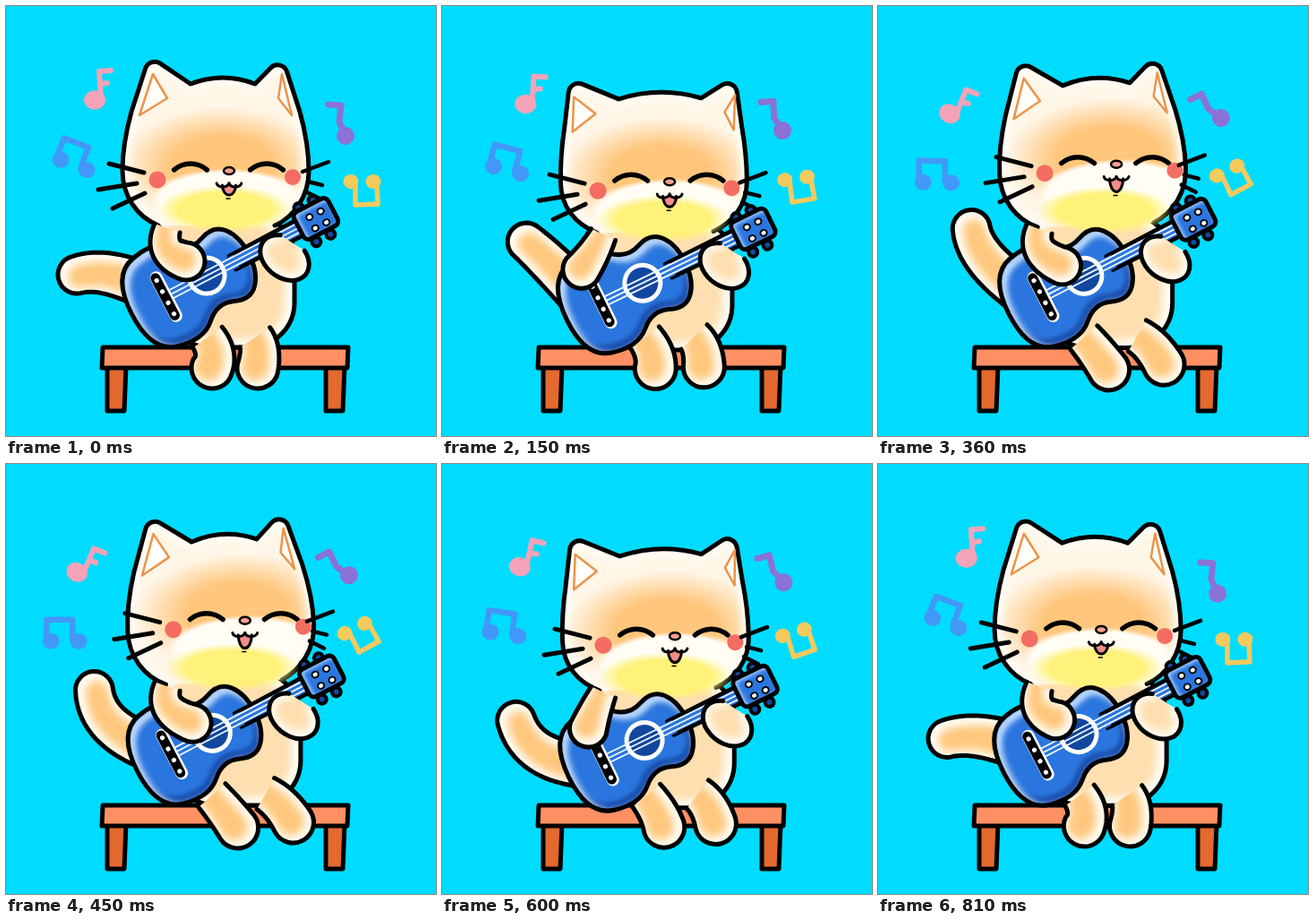
Animation of 480x480 px, one loop 840 ms. Source, as an HTML page with a canvas:

```html
<!DOCTYPE html>
<html lang="en">
<head>
<meta charset="utf-8">
<title>Guitar cat</title>
<style>
  html, body { margin: 0; width: 100%; height: 100%; overflow: hidden; background: #00dcff; }
  canvas { display: block; width: 480px; height: 480px; }
</style>
</head>
<body>
<canvas id="stage" width="480" height="480"></canvas>
<script>
const c = document.getElementById('stage').getContext('2d');
const LOOP = 840, STEP = 30, PI = Math.PI, RAD = PI / 180;
const INK = '#000', FUR = '#ffc87e', PALE = '#ffdfb0', RIM = '#fffdf6', BLUE = '#2a76de';

// ---- paths

function poly(...p) {
  const path = new Path2D();
  for (let i = 0; i < p.length; i += 2) path.lineTo(p[i], p[i + 1]);
  return path;
}

function closed(...p) {
  const path = poly(...p);
  path.closePath();
  return path;
}

function arc(x, y, rx, ry, from = 0, to = 360, turn = 0) {
  const path = new Path2D();
  path.ellipse(x, y, rx, ry, turn * RAD, from * RAD, to * RAD);
  return path;
}

function box(...args) {
  const path = new Path2D();
  path.roundRect(...args);
  return path;
}

// Closed smooth curve guided by a polygon of corners
function smooth(corners) {
  const path = new Path2D(), n = corners.length;
  for (let i = 0; i <= n; i++) {
    const [x, y] = corners[i % n], [nx, ny] = corners[(i + 1) % n];
    const mid = [(x + nx) / 2, (y + ny) / 2];
    if (i) path.quadraticCurveTo(x, y, ...mid);
    else path.moveTo(...mid);
  }
  return path;
}

// Limb along a quadratic spine, open at its root and round at its tip
function limb(x0, y0, x1, y1, x2, y2, r0, r1) {
  const path = new Path2D(), back = [];
  let a = 0;
  for (let i = 0; i <= 16; i++) {
    const k = i / 16, m = 1 - k, r = r0 + (r1 - r0) * k;
    const x = m * m * x0 + 2 * m * k * x1 + k * k * x2;
    const y = m * m * y0 + 2 * m * k * y1 + k * k * y2;
    a = Math.atan2(m * (y1 - y0) + k * (y2 - y1), m * (x1 - x0) + k * (x2 - x1));
    const nx = Math.sin(a) * r, ny = -Math.cos(a) * r;
    path.lineTo(x + nx, y + ny);
    back.unshift([x - nx, y - ny]);
  }
  path.arc(x2, y2, r1, a - PI / 2, a + PI / 2);
  back.forEach(p => path.lineTo(...p));
  return path;
}

// ---- painting

function line(path, color = INK, width = 5) {
  c.strokeStyle = color;
  c.lineWidth = width;
  c.stroke(path);
}

function shape(path, fill, width = 5, ink = INK) {
  c.fillStyle = fill;
  c.fill(path);
  if (width) line(path, ink, width);
}

const oval = (x, y, rx, ry, fill, width = 0, ink = INK) => shape(arc(x, y, rx, ry), fill, width, ink);

// Blurred stroke kept inside its path
function soft(path, color, width, dx, dy, blur) {
  c.save();
  c.clip(path);
  c.filter = `blur(${blur}px)`;
  c.translate(dx, dy);
  line(path, color, width);
  c.restore();
}

function fur(path, tone = FUR, dx = 0, dy = 0, width = 15) {
  shape(path, tone, 0);
  soft(path, RIM, width, dx, dy, 5);
  line(path);
}

function glow(x, y, rx, ry, color, core) {
  const g = c.createRadialGradient(0, 0, core, 0, 0, 1);
  g.addColorStop(0, color);
  g.addColorStop(1, color + '00');
  at(x, y, 0, () => {
    c.scale(rx, ry);
    c.fillStyle = g;
    c.fillRect(-1, -1, 2, 2);
  });
}

function at(x, y, turn, draw) {
  c.save();
  c.translate(x, y);
  c.rotate(turn * RAD);
  draw();
  c.restore();
}

// ---- parts: s is the sway from left to right, u how far the body dips

function notes(s) {
  const pink = '#f5a3b8', blue = '#4298f8', violet = '#8a72d6', gold = '#f5ca5c';
  at(99 - 20 * s, 105 + 16 * s, 27 * s, () => {
    oval(0, 0, 12, 10.5, pink);
    line(poly(7, -2, 5, -32, 18, -33), pink, 6);
    line(poly(6, -18, 14, -19), pink, 6);
  });
  at(75 - 10 * s, 177 + 21 * s, 21 - 21 * s, () => {
    for (const x of [-15, 16]) oval(x, 0, 9.5, 9, blue);
    line(poly(-20, 0, -20, -24, 9, -24, 9, -2), blue, 6.5);
  });
  at(379 + 4 * s, 145 - 21 * s, -32 * s, () => {
    oval(0, 0, 10, 10, violet);
    line(poly(-19, -35, -5, -34, -7, -16, 0, 0), violet, 7);
  });
  at(398 - 8 * s, 197 - 13 * s, -27 * s, () => {
    for (const x of [-13, 12]) oval(x, -1, 8.5, 8, gold);
    line(poly(-8, 2, -8, 25, 17, 24, 16, 2), gold, 5.5);
  });
}

function bench() {
  for (const x of [123, 367]) shape(closed(x - 10, 402, x + 11, 402, x + 9, 452, x - 10, 452), '#e3692f');
  shape(closed(108, 381, 382, 381, 381, 404, 107, 404), '#ff9064');
}

function face(s) {
  const right = 1 - s, low = 11 + 4 * s;
  for (const x of [-43, 42 - 2 * s]) line(arc(x, 20, 28, 28, -131, -49), INK, 5.5);
  oval(-80, 10, 9.5, 9.5, '#f36d62');
  oval(65 + 6 * right, 7, 9, 9, '#f36d62');

  shape(arc(0, 16, 7.5, low, 0, 180), '#f58d86', 3);
  for (const x of [-7, 7]) line(arc(x, 13, 7, 5, 10, 170), INK, 3);
  line(poly(-3, low + 20, 1, low + 20), INK, 1.5);
  oval(0, 0, 6, 4, '#f9a090', 2.5);

  line(poly(-134, -8, -95, 2));
  line(poly(-146, 21, -103, 14));
  line(poly(-130, 42, -94, 25));
  c.translate(-13 * s, 0);
  line(poly(82, 1, 111, -10), INK, 4.5);
  line(poly(88, 12, 104, 16), INK, 4.5);
  line(poly(85, 23, 101, 31), INK, 4.5);
}

function head(u, s) {
  const mid = 234 + 2 * u, cheek = 184 + 12 * u, chin = 245 + 8 * u;
  const ear = side => ({
    side,
    base: [mid + side * (94 + 5 * u), 118 + 18 * u],
    tip: [mid + side * (74 + 18 * u), 56 + 25 * u],
    notch: [mid + 8 + side * (36 + 10 * u), 87 + 17 * u]
  });
  const l = ear(-1), r = ear(1), skull = new Path2D();
  skull.moveTo(mid - 64, chin);
  skull.bezierCurveTo(mid - 88, chin - 10, mid - 104, cheek + 28, mid - 104, cheek);
  skull.quadraticCurveTo(mid - 104, cheek - 30, ...l.base);
  skull.arcTo(...l.tip, ...l.notch, 11);
  skull.lineTo(...l.notch);
  skull.quadraticCurveTo(mid + 8, 73 + 17 * u, ...r.notch);
  skull.arcTo(...r.tip, ...r.base, 11);
  skull.lineTo(...r.base);
  skull.quadraticCurveTo(mid + 104, cheek - 30, mid + 104, cheek);
  skull.bezierCurveTo(mid + 104, cheek + 28, mid + 88, chin - 10, mid + 66, chin);

  const nx = 249 + 18 * s, ny = 184 + 15 * u - 10 * s;
  at(235 + 6 * s - 1.4 * u, 190 - 2 * s, -2.5 * s, () => {
    c.translate(-235, -190);
    shape(skull, '#fff6e8', 0);
    c.save();
    c.clip(skull);
    glow(nx - 8 - 6 * s, ny - 6, 114, 66, '#ffc67c', .5);
    glow(nx - 2 - 6 * s, ny + 33, 88, 36, '#fffdf4', .86);
    c.restore();
    soft(skull, RIM, 14, 0, 0, 5);
    line(skull);
    for (const { side, base, tip, notch } of [l, r]) {
      shape(closed(tip[0] + 2 - 2 * side, tip[1] + 20, base[0] - 9 * side, base[1] + 4,
        notch[0] + 26 * side, notch[1] + 16), '#fffefa', 2.5, '#ea944a');
    }
  });
  glow(244 + 9 * s, 227 + 11 * u, 75, 27, '#fff27a', .7);
  at(nx, ny, 0, () => face(s));
}

function guitar(u, s) {
  const half = [[53, 22], [32, 47], [-4, 32], [-35, 62], [-94, 48]];
  const body = smooth([...half, ...half.map(([x, y]) => [x, -y]).reverse()]);
  at(224 - 2 * u + 6.5 * s, 301 + 8.5 * u - s, 1.5 * u - 27.5, () => {
    shape(body, BLUE, 0);
    soft(body, '#1a4fae', 10, -1, -5, 2);
    soft(body, '#c9e2ff', 9, 2, 5, 3);
    line(body);

    oval(0, 0, 20, 20, '#11479f', 5, '#fff');
    shape(closed(32, -8, 118, -9, 118, 10, 32, 9), BLUE, 4.5);
    c.fillStyle = BLUE;
    c.fillRect(23, -7, 14, 15);
    for (const y of [-5, 0, 5]) line(poly(-46, y, 116, y), '#f2f8ff', 1.8);

    line(poly(-51, -24, -51, 24), '#fff', 14);
    line(poly(-52, -24, -52, 23), INK, 11);
    for (const y of [-21, -7, 7, 21]) oval(-52, y, 2.6, 2.6, '#fff');

    for (const x of [126, 144]) for (const y of [-20, 23]) oval(x, y, 5, 5, '#17479c', 4);
    const top = box(116, -17, 43, 34, 6);
    shape(top, BLUE, 0);
    soft(top, '#a9d0ff', 5, 2, 2, 2);
    line(top);
    for (const x of [132, 146]) for (const y of [-5, 9]) oval(x, y, 3.6, 3.3, '#fff', 2);
  });
}

function draw(t) {
  const a = 2 * PI * t / LOOP, sin = Math.sin(a), cos = Math.cos(a);
  const s = (1 - cos) / 2, dip = sin * sin, u = dip * (1.08 + .35 * cos);

  c.fillStyle = '#00dcff';
  c.fillRect(0, 0, 480, 480);
  c.lineCap = c.lineJoin = 'round';

  notes(s);
  bench();

  fur(limb(165, 317 + 20 * dip, 108 + 4 * cos + 10 * sin, 290 + 20 * dip - 25 * sin,
    90 - 11 * cos + 10 * sin, 275 + 25 * cos - 20 * sin - 12 * sin * cos, 25, 21), FUR, 3, 2, 17);
  at(7 * s, 3 * u, 0, () => fur(box(170, 232, 152, 149, [20, 50, 50, 60]), PALE, -2, 0, 18));
  fur(limb(278 + 12 * s, 370 - 2 * s, 286 + 22 * s, 382 - 4 * s, 281 + 40 * s, 404 - 4 * s, 20, 23), FUR, -3, -1);
  fur(limb(225 + 5 * s, 370, 238 + 8 * s, 388, 230 + 29 * s, 404 + 2 * s, 20, 23), FUR, -4, -1);

  head(u, s);
  guitar(u, s);

  const strum = 201 + 9 * s - 40 * u - 24 * dip * sin * cos;
  fur(limb(180, 248 + 7 * u, 170, 276, strum, 285 + 4 * s + 8 * u, 15, 21), FUR, -2, -2);
  at(10 * s + 1.5 * u, 9 * u, 0, () => fur(arc(311, 281, 30, 22, -65, 230, 38), PALE, -1, -1));
}

function tick() {
  const t = performance.now() % LOOP;
  draw(Math.floor(t / STEP) * STEP);
  requestAnimationFrame(tick);
}
tick();
</script>
</body>
</html>
```
